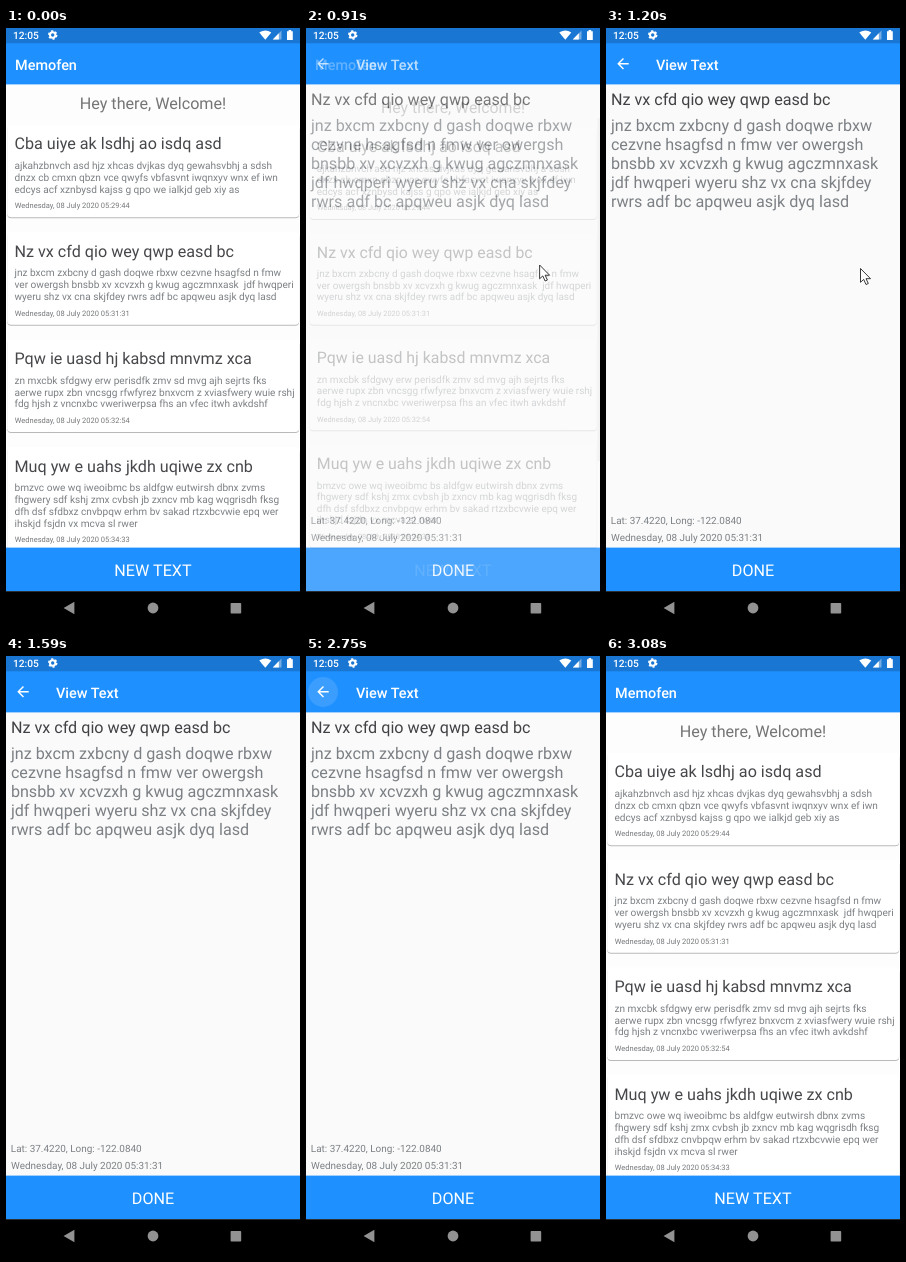
Recreate the animation shown at these times as an HTML page. Size 294 by 600 pixels, loop 3.34 s.

```html
<!DOCTYPE html>
<html lang="en">
<head>
<meta charset="utf-8">
<title>Notes app</title>
<style>
html, body { margin: 0; width: 100%; height: 100%; overflow: hidden; background: #000; }
svg { display: block; width: 294px; height: 600px; }
text { font-family: Roboto, Arial, sans-serif; white-space: pre; text-rendering: geometricPrecision; }
.card { fill: #fff; filter: drop-shadow(0 1px .7px #0004); }
</style>
</head>
<body>
<svg id="stage" viewBox="0 0 294 600"></svg>
<script>
const PERIOD = 3340, BLUE = '#1e90ff', PAPER = '#fafafa', LIST_PAPER = '#fdfdfd';
const DARK = '#46474a', GREY = '#7c8084', BIG = 16.15, SMALL = 10.1;

const cards = [
  ['Cba uiye ak lsdhj ao isdq asd', '05:29:44',
    'ajkahzbnvch asd hjz xhcas dvjkas dyq gewahsvbhj a sdsh',
    'dnzx cb cmxn qbzn vce qwyfs vbfasvnt iwqnxyv wnx ef iwn',
    'edcys acf xznbysd kajss g qpo we ialkjd geb xiy as'],
  ['Nz vx cfd qio wey qwp easd bc', '05:31:31',
    'jnz bxcm zxbcny d gash doqwe rbxw cezvne hsagfsd n fmw',
    'ver owergsh bnsbb xv xcvzxh g kwug agczmnxask  jdf hwqperi',
    'wyeru shz vx cna skjfdey rwrs adf bc apqweu asjk dyq lasd'],
  ['Pqw ie uasd hj kabsd mnvmz xca', '05:32:54',
    'zn mxcbk sfdgwy erw perisdfk zmv sd mvg ajh sejrts fks',
    'aerwe rupx zbn vncsgg rfwfyrez bnxvcm z xviasfwery wuie rshj',
    'fdg hjsh z vncnxbc vweriwerpsa fhs an vfec itwh avkdshf'],
  ['Muq yw e uahs jkdh uqiwe zx cnb', '05:34:33',
    'bmzvc owe wq iweoibmc bs aldfgw eutwirsh dbnx zvms',
    'fhgwery sdf kshj zmx cvbsh jb zxncv mb kag wqgrisdh fksg',
    'dfh dsf sfdbxz cnvbpqw erhm bv sakad rtzxbcvwie epq wer',
    'ihskjd fsjdn vx mcva sl rwer']
];
const note = [
  'jnz bxcm zxbcny d gash doqwe rbxw', 'cezvne hsagfsd n fmw ver owergsh',
  'bnsbb xv xcvzxh g kwug agczmnxask', 'jdf hwqperi wyeru shz vx cna skjfdey',
  'rwrs adf bc apqweu asjk dyq lasd'
];

const text = (x, y, size, fill, str, extra = '') =>
  `<text x="${x}" y="${y}" font-size="${size}" fill="${fill}" ${extra}>${str}</text>`;
const centred = (y, fill, str) => text(147, y, BIG, fill, str, 'text-anchor="middle"');
const rect = (x, y, w, h, fill, extra = '') =>
  `<rect x="${x}" y="${y}" width="${w}" height="${h}" fill="${fill}" ${extra}/>`;
const lines = (x, y, size, list) =>
  list.map((s, i) => text(x, y + i * size * 1.172, size, GREY, s)).join('');
const date = time => 'Wednesday, 08 July 2020 ' + time;
const heading = (x, str) => text(x, 41.5, 14.45, '#fff', str, 'font-weight="500"');
const button = str => rect(0, 519.6, 294, 43.6, BLUE) + centred(547.7, '#fff', str);

const card = ([title, time, ...body], i) => {
  const y = 96.7 + i * 107.45, extra = (body.length - 3) * 11.8;
  return `<rect class="card" x="1.2" y="${y}" width="292" height="${92.5 + extra}" rx="4"/>` +
    text(8.5, y + 24.5, BIG, DARK, title) + lines(8.5, y + 44.2, SMALL, body) +
    text(8.8, y + 83.5 + extra, 7.5, '#75777a', date(time));
};

const listPage = rect(0, 0, 294, 564, LIST_PAPER) +
  centred(81.3, '#757575', 'Hey there, Welcome!') + cards.map(card).join('');

const viewPage = rect(0, 56, 294, 507, PAPER) +
  text(4.9, 77.2, BIG, '#404144', cards[1][0]) + lines(4.9, 102.9, BIG, note) +
  text(4.8, 495.7, 9.95, GREY, 'Lat: 37.4220, Long: -122.0840') +
  text(5.1, 513.1, 9.93, GREY, date(cards[1][1])) + button('DONE');

const viewHeader = heading(50, 'View Text') +
  `<circle id="ripple" cx="17" cy="36" fill="#fff"/>
  <path transform="translate(8.4 27.2) scale(.715)" fill="#fff"
    d="M20 11H7.83l5.59-5.59L12 4l-8 8 8 8 1.41-1.41L7.83 13H20z"/>`;

const statusBar = rect(0, 0, 294, 15.3, '#1976d2') +
  text(7, 10.9, 10.2, '#fff', '12:05', 'font-weight="500"') +
  `<g fill="none" stroke="#fff"><circle cx="46.7" cy="7" r="2.7" stroke-width="2"/>
  <circle cx="46.7" cy="7" r="4" stroke-width="1.5" stroke-dasharray="2.1 2.09"/></g>
  <g fill="#fff"><path d="M253.3 4.6Q259.3 .2 265.3 4.6L259.3 11.8Z"/>
  <path d="M275.5 2.4V11.6H266.8Z" opacity=".4"/><path d="M272.8 5.3V11.6H266.8Z"/>
  <path d="M281 3.2H282.6V2H285.2V3.2H286.8V12H281Z"/></g>`;

const navBar = rect(0, 563.2, 294, 36.8, '#000') +
  `<g fill="#929292"><path d="M57.6 580L68.4 573.8V586.2Z"/><circle cx="147" cy="580" r="5.4"/>` +
  rect(224.6, 575, 10.6, 10.6, '#929292', 'rx=".8"') + '</g>';

stage.innerHTML = rect(0, 0, 294, 564, LIST_PAPER) +
  `<g id="list">${listPage}</g><g class="old">${button('NEW TEXT')}</g><g class="new">${viewPage}</g>` +
  rect(291.5, 90, 2.5, 343, '#f2f2f2', 'id="thumb"') +
  rect(0, 0, 294, 56.4, BLUE) +
  `<g class="old">${heading(9, 'Memofen')}</g><g class="new">${viewHeader}</g>` +
  statusBar + navBar +
  `<path id="cursor" d="M0 0V13.8L3.2 10.9 5.5 16 7.8 15 5.5 10.2H10Z"
    fill="#fff" stroke="#222" stroke-width=".9"/>`;

const bursts = [[70, 530, 7], [680, 1200, 8], [1280, 1590, 5],
  [1830, 2290, 7], [2370, 2750, 6], [2930, 3080, 3]];
function snap(t) {
  let last = 0;
  for (const [a, b, n] of bursts) {
    if (t < a) break;
    const step = (b - a) / (n - 1);
    last = a + Math.min(n - 1, Math.floor((t - a) / step + .05)) * step;
  }
  return last;
}

// Pointer visits as [time, x, y]; it is hidden from each visit's last time on.
const visits = [
  [[70, 287, 251], [223, 258, 236], [376, 222, 225], [530, 233.4, 237], [900, 233.4, 237],
    [1050, 244.5, 238.3], [1200, 254.5, 240.5], [1510, 272, 244], [1580, 276, 244]],
  [[1830, -4, 46], [2055, 19.5, 46.5], [2140, 19.5, 46.5], [2290, 17, 43],
    [2520, 16, 42], [2674, -4, 42], [2740, -12, 42]]
];
function pointer(t) {
  for (const path of visits) {
    const i = path.findIndex(k => t < k[0]);
    if (i < 1) continue;
    const [t0, x0, y0] = path[i - 1], [t1, x1, y1] = path[i], p = (t - t0) / (t1 - t0);
    return [x0 + (x1 - x0) * p, y0 + (y1 - y0) * p];
  }
  return [-50, 0];
}

const clamp = v => Math.max(0, Math.min(1, v));
const [list, ripple, thumb, cursor] =
  ['list', 'ripple', 'thumb', 'cursor'].map(id => document.getElementById(id));
const fade = (name, opacity) =>
  stage.querySelectorAll(name).forEach(g => g.setAttribute('opacity', opacity));

function draw(now) {
  const t = snap(now % PERIOD);
  const opening = 1 - (1 - clamp((t - 660) / 540)) ** 2;
  const shown = t < 2930 ? opening : clamp((3080 - t) / 230);
  const k = 1 - .024 * shown;
  list.setAttribute('transform', `translate(147 300) scale(${k}) translate(-147 -300)`);
  fade('.old', 1 - shown);
  fade('.new', shown);
  thumb.setAttribute('opacity', t >= 680 && t < 1190 ? 1 : 0);

  const press = t < 2930 ? clamp((t - 2370) / 300) : 0;
  ripple.setAttribute('r', 8 + 7 * press);
  ripple.setAttribute('opacity', .13 * press);

  cursor.setAttribute('transform', `translate(${pointer(t)})`);
  requestAnimationFrame(draw);
}
draw(0);
</script>
</body>
</html>
```
